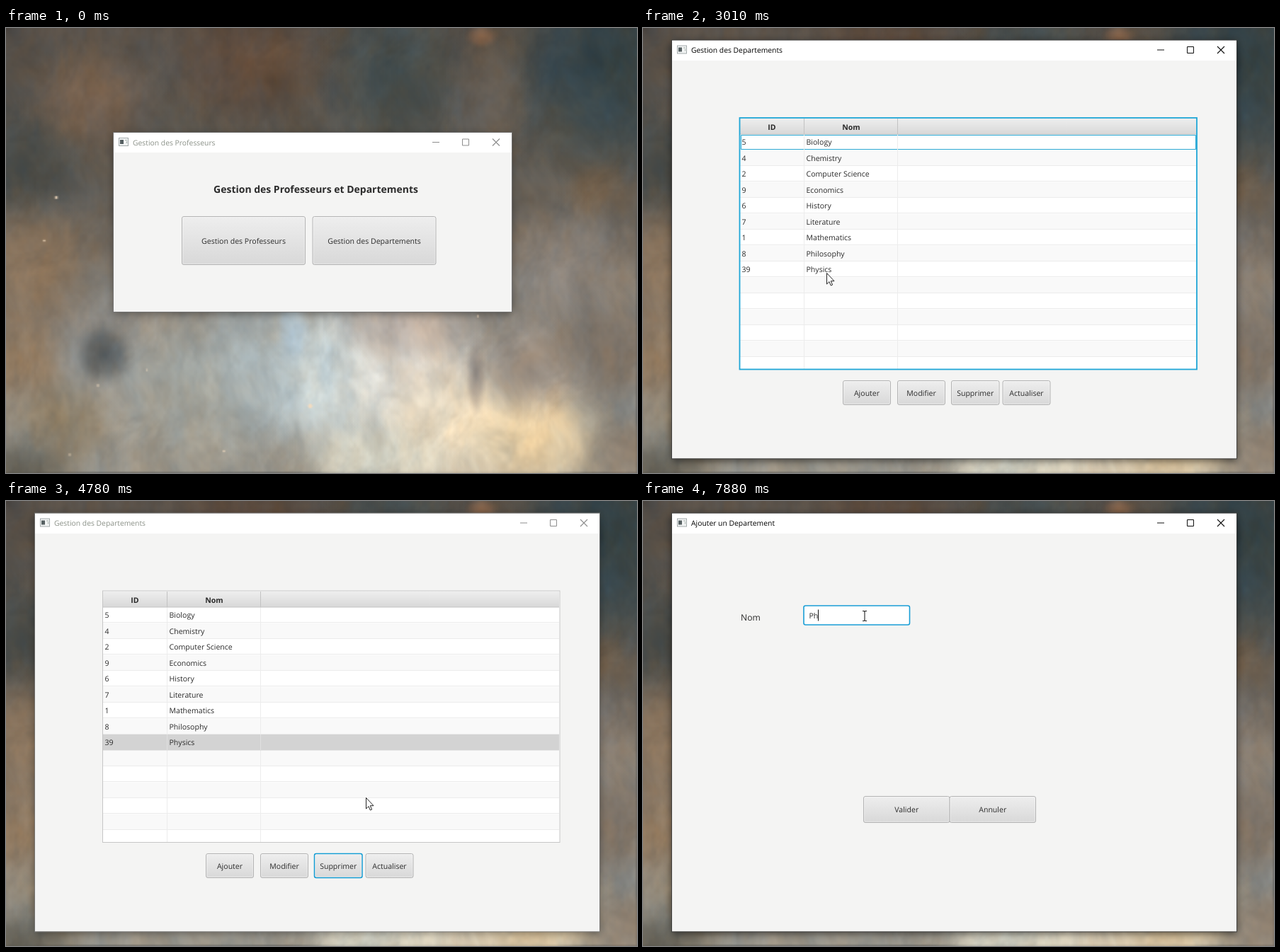
Write an HTML page with a canvas that moves like this. It is 891x629 px and loops after 8 s.

```html
<!DOCTYPE html>
<html lang="fr">
<head>
<meta charset="utf-8">
<title>Gestion des Departements</title>
<style>
html, body { margin: 0; width: 100%; height: 100%; overflow: hidden; background: #555; }
canvas, svg { position: absolute; left: 0; top: 0; width: 891px; height: 629px; }
text { font: 10.55px "Open Sans", "Noto Sans", sans-serif; fill: #2b2b2b; text-rendering: geometricPrecision; }
.mid { text-anchor: middle; }
.bold { font-weight: 700; }
.caption text { font-size: 10.35px; fill: #000; }
.caption .glyph { stroke: #111; fill: none; }
.shadow { fill: #000; opacity: .6; filter: url(#blur); }
.edge { fill: none; stroke: #3c3c3c; stroke-opacity: .8; }
.inactive .caption text { fill: #8b9188; }
.inactive .caption .glyph { stroke: #8d8d8d; }
.inactive .shadow { opacity: .38; }
.inactive .edge { stroke: #777; }
.btn rect { fill: url(#normal); stroke: #b4b4b4; }
.btn .shine { fill: none; stroke: #fff; stroke-opacity: .35; }
.btn.hover .face { fill: url(#hover); }
.btn.armed .face { fill: url(#armed); }
.btn.focus .face { stroke: #0f9bd3; stroke-width: 1.5; }
.grid { stroke: #ececec; }
.frame { fill: none; stroke: #c6c6c6; }
.focus .frame { stroke: #1fa6d6; stroke-width: 1.8; }
.cell { fill: none; stroke: #2ba9d4; }
.picked rect { fill: #0096c9; }
.picked path { stroke: #2aa9d6; }
.picked text { fill: #fff; }
.dimmed rect { fill: #d3d3d3; }
.dimmed path { stroke: #e0e0e0; }
</style>
</head>
<body>
<canvas id="sky" width="446" height="315"></canvas>
<svg viewBox="0 0 891 629" xmlns="http://www.w3.org/2000/svg">
  <defs>
    <filter id="blur" x="-10%" y="-10%" width="120%" height="125%"><feGaussianBlur stdDeviation="6"/></filter>
    <linearGradient id="normal" x2="0" y2="1"><stop stop-color="#eeeeee"/><stop offset="1" stop-color="#d8d8d8"/></linearGradient>
    <linearGradient id="hover" x2="0" y2="1"><stop stop-color="#f5f5f5"/><stop offset="1" stop-color="#e4e4e4"/></linearGradient>
    <linearGradient id="armed" x2="0" y2="1"><stop stop-color="#dddddd"/><stop offset="1" stop-color="#c7c7c7"/></linearGradient>
  </defs>
  <g id="stage"></g>
  <circle id="click" r="11" fill="#f0e030" fill-opacity=".7"/>
  <path id="arrow" d="M.5 .5V16L4 12.6 6.3 18 8.6 17 6.3 11.7H11Z" fill="#fff" stroke="#1a1a1a" stroke-width=".95"/>
  <path id="beam" d="M-3 -6.5H-1L0 -5.5 1 -6.5H3M0 -5.5V6.5M-3 7.5H-1L0 6.5 1 7.5H3" fill="none" stroke="#222" stroke-width="1.1"/>
</svg>
<script>
const LOOP = 8000;
const $ = id => document.getElementById(id);

/* ---------- backdrop: soft clouds with seeded noise ---------- */
function hash(x, y) {
  const s = Math.sin(x * 127.1 + y * 311.7) * 43758.5453;
  return s - Math.floor(s);
}
function noise(x, y) {
  const i = Math.floor(x), j = Math.floor(y);
  let u = x - i, v = y - j;
  u *= u * (3 - 2 * u);
  v *= v * (3 - 2 * v);
  const a = hash(i, j), b = hash(i + 1, j), c = hash(i, j + 1), d = hash(i + 1, j + 1);
  return a + (b - a) * u + (c - a + (a - b - c + d) * u) * v;
}
function fbm(x, y) {
  return noise(x, y) * .4 + noise(x * 2.1, y * 2.1) * .28 + noise(x * 4.3, y * 4.3) * .2 + noise(x * 9, y * 9) * .12;
}

function paintSky() {
  const ctx = $("sky").getContext("2d");
  ctx.scale(.5, .5);
  const base = ctx.createLinearGradient(0, 0, 0, 629);
  ["#564e46", "#5a554d", "#746c62", "#96928a", "#969186"].forEach((c, i) => base.addColorStop(i / 4, c));
  ctx.fillStyle = base;
  ctx.fillRect(0, 0, 891, 629);
  // x, y, radius x, radius y, colour
  const clouds = [
    [860, 50, 190, 190, "#2d3f45"], [550, 60, 120, 150, "#414c4d"], [340, 50, 130, 110, "#5f4939"],
    [125, 105, 110, 90, "#796351"], [25, 200, 100, 100, "#444744"], [680, 110, 65, 130, "#6c655d"],
    [672, 12, 26, 18, "#8a6448"], [845, 235, 70, 50, "#77644f"], [790, 340, 130, 110, "#8a827a"],
    [30, 350, 110, 130, "#876f56"], [25, 470, 70, 80, "#8e7356"], [270, 510, 150, 150, "#a9aaa1"],
    [400, 480, 150, 150, "#b4c0c2"], [490, 500, 140, 140, "#d4dedd"], [580, 490, 130, 110, "#e3d8ca"],
    [650, 570, 170, 120, "#f8e6c6"], [560, 420, 120, 60, "#bfb2a8"], [750, 580, 120, 90, "#efd4a6"],
    [740, 480, 90, 80, "#998b7e"], [664, 490, 16, 60, "#8a8078"], [850, 460, 90, 90, "#776c61"],
    [138, 462, 46, 50, "#4c5051"], [80, 560, 90, 80, "#84765f"], [20, 625, 110, 50, "#5f5c52"],
    [875, 600, 60, 60, "#85786a"], [405, 430, 26, 60, "#aac0cf"], [520, 610, 130, 60, "#dedccb"]
  ];
  for (const [x, y, rx, ry, c] of clouds) {
    ctx.save();
    ctx.translate(x, y);
    ctx.scale(rx, ry);
    const g = ctx.createRadialGradient(0, 0, 0, 0, 0, 1);
    g.addColorStop(0, c + "e8");
    g.addColorStop(.5, c + "90");
    g.addColorStop(.8, c + "28");
    g.addColorStop(1, c + "00");
    ctx.fillStyle = g;
    ctx.fillRect(-1, -1, 2, 2);
    ctx.restore();
  }
  const img = ctx.getImageData(0, 0, 446, 315), p = img.data;
  for (let y = 0, k = 0; y < 315; y++) {
    for (let x = 0; x < 446; x++, k += 4) {
      const bend = noise(x / 30, y / 30) * .6;
      const light = .86 + .3 * fbm(x / 20 + bend, y / 28 + bend);
      const warm = (fbm(x / 18 + bend, y / 30 + 9) - .5) * 18;
      p[k] = p[k] * light + warm;
      p[k + 1] *= light;
      p[k + 2] = p[k + 2] * light - warm;
    }
  }
  ctx.putImageData(img, 0, 0);
  ctx.fillStyle = "#f3dcc0";
  for (const [x, y, r] of [[71, 240, 2], [54, 301, 1.5], [130, 506, 1.5], [430, 535, 3], [308, 599, 1.5], [199, 484, 1.2], [90, 604, 1.3], [667, 408, 1.5]]) {
    ctx.beginPath();
    ctx.arc(x, y, r, 0, 7);
    ctx.fill();
  }
}

/* ---------- widgets ---------- */
const label = (x, y, s, cls = "", size = "") =>
  `<text x="${x}" y="${y}" class="${cls}"${size && ` style="font-size:${size}px"`}>${s}</text>`;

const box = (x, y, w, h, attrs) => `<rect x="${x}" y="${y}" width="${w}" height="${h}" ${attrs}/>`;

const buttons = {};
function button(id, x, y, w, h, s) {
  buttons[id] = { x, y, w, h };
  return `<g id="${id}" class="btn">${box(x, y, w, h, 'class="face" rx="2.5"')}` +
    box(x + 1.2, y + 1.2, w - 2.4, h - 2.4, 'class="shine" rx="1.5"') +
    label(x + w / 2, y + h / 2 + 4, s, "mid") + "</g>";
}

function frame(id, x, y, w, h, bar, title, content) {
  const r = x + w, m = y + 13.5;
  return `<g id="${id}">${box(x, y + 3, w, h, 'class="shadow"')}
    ${box(x, y, w, h, 'fill="#f4f4f3"')}${box(x, y, w, bar, 'fill="#fff"')}
    <g class="caption">
      ${box(x + 7.5, y + 7.5, 13, 11, 'fill="#f2f4f4" stroke="#a3aaab"')}
      ${box(x + 9, y + 10, 5, 6, 'fill="#566062"')}
      <path d="M${x + 16} ${y + 10.5}h3M${x + 18.5} ${y + 12}v3" stroke="#a9b3ad"/>
      ${label(x + 27, y + 17.7, title)}
      <path class="glyph" d="M${r - 112} ${m}h10M${r - 69.5} ${m - 4.5}h9v9h-9z"/>
      <path class="glyph" stroke-width="1.1" d="M${r - 27} ${m - 5}l10 10m0 -10l-10 10"/>
    </g>${content}${box(x - .5, y - .5, w + 1, h + 1, 'class="edge"')}</g>`;
}

const ROW = 22.5, TOP = 150;
const names = [[5, "Biology"], [4, "Chemistry"], [2, "Computer Science"], [9, "Economics"], [6, "History"],
  [7, "Literature"], [1, "Mathematics"], [8, "Philosophy"], [39, "Physics"]];

function table() {
  let s = box(136, 127, 646, 355.5, 'fill="#fff"');
  for (let i = 0; i < 15; i++) {
    const y = TOP + i * ROW, h = Math.min(ROW, 482 - y);
    if (i % 2) s += box(137, y, 644, h, 'fill="#f9f9f9"');
    if (i) s += `<path class="grid" d="M137 ${Math.floor(y) - .5}h644"/>`;
  }
  s += '<path class="grid" d="M227.5 150v332M359.5 150v332"/>';
  s += box(137, 128, 644, 22, 'fill="url(#normal)"');
  s += '<path d="M137 150H781M227.5 128v22M359.5 128v22" stroke="#c2c2c2"/>';
  s += label(182, 143.5, "ID", "mid bold") + label(294, 143.5, "Nom", "mid bold");
  names.forEach(([n, name], i) => {
    const y = TOP + i * ROW, last = i === names.length - 1;
    const cells = label(139.5, y + 15, n) + label(230.5, y + 15, name);
    s += last ? `<g id="last">${box(137, y, 644, ROW, 'fill="none"')}
      <path d="M227.5 ${y}v22M359.5 ${y}v22" stroke="none"/>${cells}</g>` : cells;
  });
  s += '<path id="cell" class="cell" d="M227 151.5H138.5V171.5H227M228 151.5H359M228 171.5H359M360 151.5H780.5V171.5H360"/>';
  return `<g id="table">${s}${box(136.5, 127, 645.5, 355.5, 'class="frame"')}</g>`;
}

$("stage").innerHTML =
  frame("menu", 152, 148, 562, 253, 28, "Gestion des Professeurs",
    label(437.5, 232.5, "Gestion des Professeurs et Departements", "mid bold", 13.97) +
    button("profs", 248.5, 266.5, 174, 68, "Gestion des Professeurs") +
    button("depts", 433, 266.5, 174, 68, "Gestion des Departements")) +
  frame("list", 41, 17.5, 797, 591, 28.5, "Gestion des Departements",
    table() +
    button("add", 282.5, 498.5, 67, 34, "Ajouter") +
    button("edit", 359.5, 498.5, 67, 34, "Modifier") +
    button("remove", 435.5, 498.5, 67.5, 34, "Supprimer") +
    button("reload", 508, 498.5, 67, 34, "Actualiser")) +
  frame("form", 41, 17.5, 797, 591, 28.5, "Ajouter un Departement",
    label(138, 169, "Nom", "", 12.2) +
    box(227, 148, 149.5, 27, 'rx="2.5" fill="#fff" stroke="#1a9fd6" stroke-width="1.6"') +
    '<text id="typed" x="234.5" y="166"></text><path id="caret" stroke="#111"/>' +
    button("ok", 311.5, 417.5, 121.5, 37, "Valider") +
    button("cancel", 433, 417.5, 121.5, 37, "Annuler"));

/* ---------- timeline ---------- */
// start, end, steps, target of each pointer move
const moves = [
  [710, 1000, 3, 501, 299], [1850, 2870, 8, 259, 344], [3010, 3010, 1, 259, 346],
  [3500, 3930, 4, 464, 509], [4080, 4080, 1, 468, 516], [4640, 5050, 4, 548, 322],
  [5620, 6040, 4, 314, 515], [6610, 7310, 6, 313, 162]
];
const clicks = [[1290, 1420], [3210, 3350], [4360, 4500], [5350, 5470], [6330, 6470]];
const ease = u => u * u * (3 - 2 * u);

function pointer(t) {
  let x = 640, y = 362;
  for (const [from, to, n, tx, ty] of moves) {
    if (t < from) break;
    const gap = (to - from) / Math.max(1, n - 1);
    const k = gap ? Math.min(n, Math.floor((t - from) / gap + 1e-6) + 1) : n;
    const u = ease(k / n);
    x += (tx - x) * u;
    y += (ty - y) * u;
  }
  return { x, y };
}

const show = (id, on) => { $(id).style.display = on ? "" : "none"; };
const flag = (id, cls, on) => $(id).classList.toggle(cls, on);

function render(t) {
  const within = (a, b) => t >= a && t < b;
  const { x, y } = pointer(t);
  const scene = t < 1420 ? "menu" : t < 6470 ? "list" : "form";
  for (const id of ["menu", "list", "form"]) show(id, id === scene);
  flag("menu", "inactive", t < 1290);
  flag("list", "inactive", within(4500, 5470));

  const down = clicks.some(([a, b]) => within(a, b));
  const free = t >= 710 && !within(4500, 5470);
  for (const id in buttons) {
    const b = buttons[id];
    const over = free && x >= b.x && x < b.x + b.w && y >= b.y && y < b.y + b.h;
    flag(id, "hover", over);
    flag(id, "armed", over && down);
  }
  flag("depts", "focus", t >= 1290);
  flag("remove", "focus", within(4360, 6330));
  flag("add", "focus", t >= 6330);

  flag("table", "focus", t < 4360);
  show("cell", t < 3210);
  show("last", t < 5470);
  flag("last", "picked", within(3210, 4360));
  flag("last", "dimmed", t >= 4360);

  const typed = t < 7590 ? "" : t < 7880 ? "P" : "Ph";
  $("typed").textContent = typed;
  $("caret").setAttribute("d", `M${[234.5, 241.5, 247.5][typed.length]} 153.5v16`);

  const inField = scene === "form" && x > 227 && x < 377 && y > 147 && y < 175;
  show("arrow", t >= 710 && !inField);
  show("beam", inField);
  show("click", down);
  for (const id of ["arrow", "beam", "click"]) $(id).setAttribute("transform", `translate(${x} ${y})`);
}

paintSky();
render(0);
const start = performance.now();
(function tick() {
  render((performance.now() - start) % LOOP);
  requestAnimationFrame(tick);
})();
</script>
</body>
</html>
```
